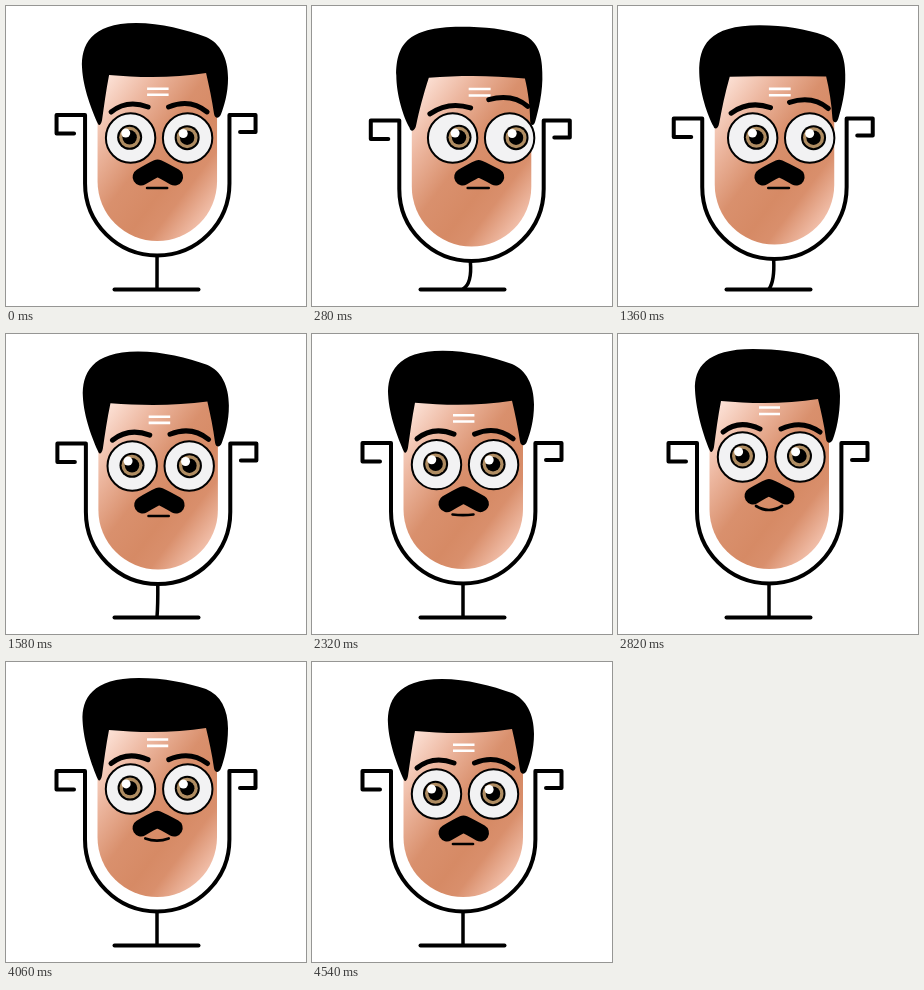
Recreate the animation shown at these times as an HTML page. Size 300 by 300 pixels, loop 5.02 s.

```html
<!DOCTYPE html>
<html lang="en">
<head>
<meta charset="utf-8">
<title>Microphone face</title>
<style>
html, body { margin: 0; width: 100%; height: 100%; overflow: hidden; background: #fff; }
svg { display: block; width: 100vw; height: 100vh; }
.line { fill: none; stroke: #000; stroke-linecap: round; stroke-linejoin: round; }
</style>
</head>
<body>
<svg viewBox="0 0 300 300">
  <defs>
    <linearGradient id="tone" x1="97" y1="70" x2="229" y2="169" gradientUnits="userSpaceOnUse">
      <stop offset="0" stop-color="#fee6dc"/>
      <stop offset=".25" stop-color="#edb8a1"/>
      <stop offset=".5" stop-color="#d9906d"/>
      <stop offset=".7" stop-color="#d68a65"/>
      <stop offset=".82" stop-color="#d98f6c"/>
      <stop offset="1" stop-color="#f0bca6"/>
    </linearGradient>
    <circle id="white" r="24.7" fill="#f2f2f3" stroke="#000" stroke-width="2"/>
    <g id="iris">
      <circle r="12.5"/>
      <circle r="10.5" fill="#b08d62"/>
      <circle r="7.2"/>
      <circle cx="-3.9" cy="-4.2" r="4.5" fill="#fff"/>
    </g>
  </defs>
  <path class="line" stroke-width="4" d="M108.5 283.5H192.5"/>
  <path class="line" stroke-width="3.5" id="stem"/>
  <g id="body">
    <path class="line" stroke-width="4"
      d="M68 127.5H50.5V109H79V177.500A72.200 72 0 0 0 223.400 177.500V109H249.500V126H234"/>
    <path fill="url(#tone)" d="M96 64H206L211 90V175.300A59.750 59.750 0 0 1 91.500 175.300V90Z"/>
  </g>
  <path id="hair"/>
  <path class="line" id="marks" stroke-width="2.6" style="stroke:#fff;stroke-linecap:butt"/>
  <use href="#white" id="eyeL"/><use href="#white" id="eyeR"/>
  <use href="#iris" id="irisL"/><use href="#iris" id="irisR"/>
  <path class="line" id="browL" stroke-width="5"/>
  <path class="line" id="browR" stroke-width="5"/>
  <path class="line" id="mouth" stroke-width="2.7"/>
  <path class="line" id="moustache" stroke-width="17"/>
</svg>
<script>
// Each part: poses for [neutral, turned, smiling]
const poses = {
  body: ['translate(0 0)', 'translate(9 6)', 'translate(0 0)'],
  stem: ['M151 250C151 262 151 273 151 283', 'M159 256C160 267 159 279 151 283', 'M151 250C151 262 151 273 151 283'],
  hair: [
    'M92 118C86 105 77 82 76 62C75 40 84 17 130 17C155 17 180 24 200 31C214 37 222 52 222 72C222 88 218 100 215 108C213 113 209 113 208 108C206 94 203 80 200 67C170 72 135 72 103 69C100 84 98 100 96 114C95 119 93 120 92 118Z',
    'M98 122C92 112 85 90 85 70C85 40 95 21 150 21C175 21 195 23 210 28C226 33 231 48 231 66C232 85 227 105 224 116C223 121 219 121 219 115C219 100 217 85 214 73C180 69 150 69 118 72C112 90 108 105 105 119C104 126 99 127 98 122Z',
    'M92 117C86 103 78 78 77 56C76 34 88 15 135 15C160 15 182 18 200 24C215 30 222 44 222 62C222 82 218 97 215 105C213 110 209 110 208 105C206 90 203 77 200 65C170 70 135 70 103 67C100 82 98 98 96 113C95 118 93 119 92 117Z'
  ],
  marks: ['M141 82.7H162.5M141 88.8H162.5', 'M158 83H180M158 89.5H180', 'M141 73.5H162M141 80H162'],
  eyeL: ['translate(124.5 132)', 'translate(142 132)', 'translate(124.5 123)'],
  eyeR: ['translate(181.5 132)', 'translate(199 132)', 'translate(182 123)'],
  irisL: ['translate(123.5 131.3)', 'translate(149 131.3)', 'translate(124.5 122)'],
  irisR: ['translate(181 131.7)', 'translate(206 131.7)', 'translate(181.5 122)'],
  browL: ['M105 106Q121 93 142 101', 'M119 108Q138 95 160 102', 'M105 98Q121 85 142 95'],
  browR: ['M162.5 101Q184 92 201 106', 'M178 93Q202 87 217 100', 'M163 95Q184 85 202 98'],
  mouth: ['M141 182Q151 182 161 182', 'M157 182Q167.5 182 178 182', 'M138 172Q151 180 164 172'],
  moustache: ['M135 171Q145 165 151.5 162Q158 165 168.5 171', 'M152 171Q162 165 168 162.5Q174 165 185 171', 'M135 162Q145 156 151 153.5Q157 156 168 162']
};

const loop = 5020;
const easeOut = x => 1 - (1 - x) ** 2.5;
const curve = (s, a, b) => 3 * (1 - s) ** 2 * s * a + 3 * (1 - s) * s * s * b + s ** 3;
function easeInOut(x) {
  let lo = 0, hi = 1;
  for (let i = 0; i < 20; i++) {
    const mid = (lo + hi) / 2;
    if (curve(mid, .33, .5) < x) lo = mid; else hi = mid;
  }
  return curve(lo, 0, 1);
}

// [start, end, from pose, to pose, easing]
const moves = [
  [0, 440, 0, 1, easeOut],
  [1120, 1740, 1, 0, easeInOut],
  [2180, 2820, 0, 2, easeInOut],
  [3740, 4540, 2, 0, easeInOut]
];

function mix(a, b, p) {
  const goal = b.match(/[\d.]+/g);
  let i = 0;
  return a.replace(/[\d.]+/g, n => (+n + (goal[i++] - n) * p).toFixed(3));
}

function draw(now) {
  const t = now % loop;
  const [start, end, from, to, ease] = moves.findLast(m => t >= m[0]);
  const p = ease(Math.min(1, (t - start) / (end - start)));
  for (const [id, pose] of Object.entries(poses)) {
    const attr = pose[0].startsWith('M') ? 'd' : 'transform';
    document.getElementById(id).setAttribute(attr, mix(pose[from], pose[to], p));
  }
}

const begin = performance.now();
function tick() {
  draw(performance.now() - begin);
  requestAnimationFrame(tick);
}
tick();
</script>
</body>
</html>
```
